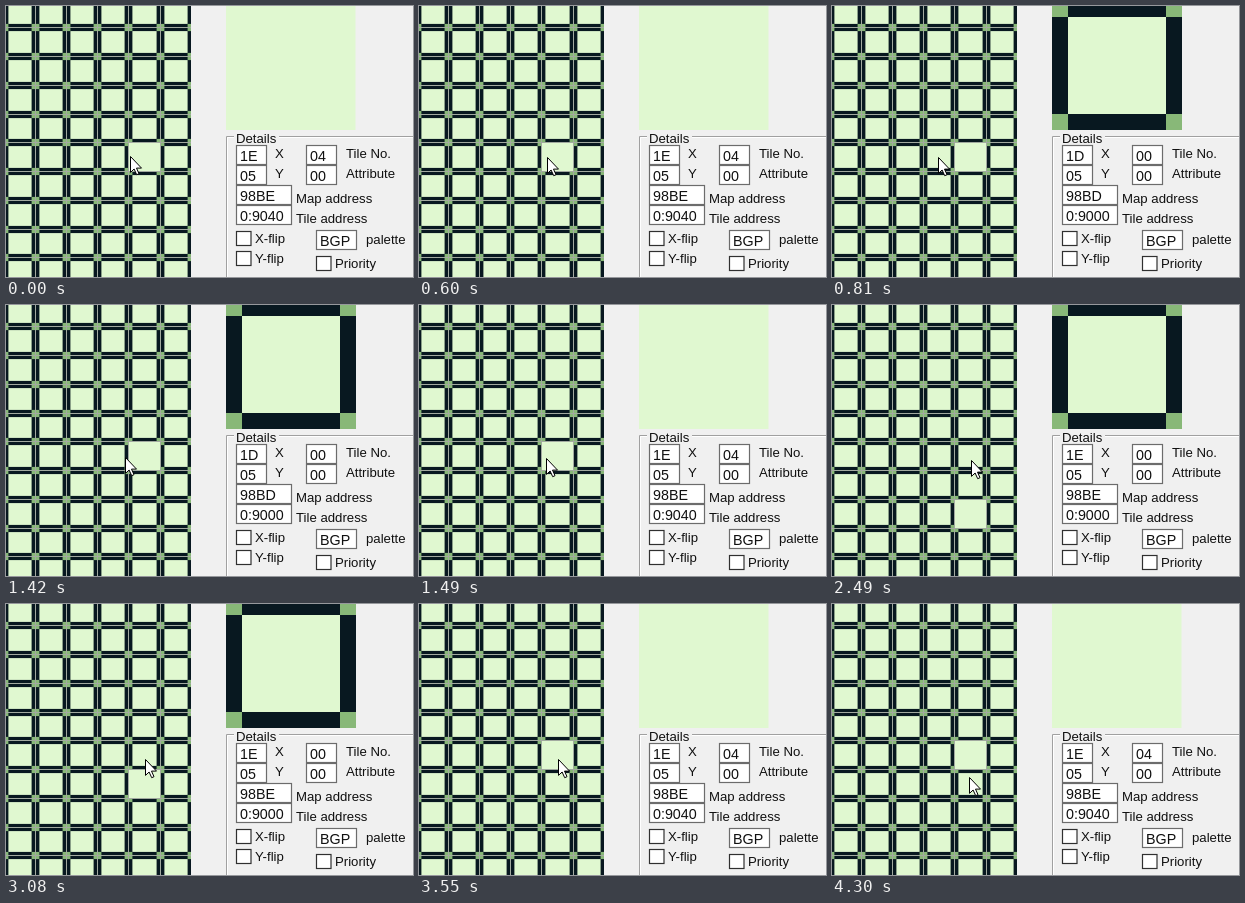
Write an HTML page that moves like this. It is 407 px wide and 271 px high and loops after 4.37 s.

```html
<!DOCTYPE html>
<html lang="en">
<head>
<meta charset="utf-8">
<title>Tile map viewer</title>
<style>
  html, body { margin: 0; width: 100%; height: 100%; overflow: hidden; background: #f0f0f0; }
  svg { display: block; width: 407px; height: 271px; }
  text { font: 13.2px "Liberation Sans", Arial, sans-serif; fill: #101010; }
  .value { font-size: 14.3px; }
  .box { fill: #fff; stroke: #6c6c6c; stroke-width: 1.2; }
  .check { stroke: #303030; }
</style>
</head>
<body>
<svg id="stage" viewBox="0 0 407 271"></svg>
<script>
const LIGHT = '#e0f8d0', MID = '#88b878', DARK = '#081820', LINE = '#a2aaa0';
const LOOP = 4370;
const CELL_W = 31.2, CELL_H = 28.75, LEFT = -1.9, TOP = -6.9, COLS = 6, ROWS = 10;
const stage = document.getElementById('stage');

function add(tag, attrs, parent = stage) {
  const el = document.createElementNS('http://www.w3.org/2000/svg', tag);
  for (const key in attrs) el.setAttribute(key, attrs[key]);
  return parent.appendChild(el);
}
const rect = (x, y, width, height, fill, parent) =>
  add('rect', { x, y, width, height, fill }, parent);

function label(x, y, str, cls = '') {
  const el = add('text', { x, y, class: cls });
  el.textContent = str;
  return el;
}
const box = (x, y, width, height, cls = '') =>
  add('rect', { x: x + .5, y: y + .5, width, height, class: 'box ' + cls });

function field(x, y, w, str = '') {
  box(x, y, w, 19);
  return label(x + 4, y + 16, str, 'value');
}
function check(x, y, str) {
  box(x, y, 14.5, 14, 'check');
  label(x + 19, y + 12, str);
}

// Tile map: grid lines sit on whole pixels
const clip = add('clipPath', { id: 'map' });
rect(0, 0, 185, 271, LIGHT, clip);
const map = add('g', { 'clip-path': 'url(#map)' });
const bx = CELL_W / 8, by = CELL_H / 8;
const colX = c => Math.floor(LEFT + c * CELL_W);
const rowY = r => Math.floor(TOP + r * CELL_H);

rect(0, 0, 185, 271, DARK, map);
for (let r = 0; r < ROWS; r++)
  for (let c = 0; c <= COLS; c++) {
    const x = colX(c) + .5, y = rowY(r) + .5;
    const w = colX(c + 1) + .5 - x, h = rowY(r + 1) + .5 - y;
    rect(x + bx, y + by, w - 2 * bx, h - 2 * by, LIGHT, map);
    rect(x - bx, y - by, 2 * bx, 2 * by, MID, map);
  }
const blank = rect(colX(4) + 1, 0, colX(5) - colX(4) - 1, CELL_H, LIGHT, map);
for (let c = 0; c < COLS; c++) rect(colX(c), 0, 1, 271, LINE, map);
for (let r = 0; r < ROWS; r++) rect(0, rowY(r), 185, 1, LINE, map);

// Enlarged tile
rect(220, 0, 129.5, 124, LIGHT);
const preview = add('g', {});
rect(220, 0, 130, 124, DARK, preview);
rect(236, 11, 98, 97, LIGHT, preview);
for (const x of [220, 334]) {
  rect(x, 0, 16, 11, MID, preview);
  rect(x, 108, 16, 16, MID, preview);
}

// Details panel
add('path', { d: 'M228 130.5H220.5V271M273 130.5H407', fill: 'none', stroke: '#a0a0a0' });
add('path', { d: 'M228 131.5H221.5V271M273 131.5H407', fill: 'none', stroke: '#fff' });
label(230, 137, 'Details');
label(269, 152, 'X');
label(269, 172, 'Y');
label(340, 152, 'Tile No.');
label(340, 172, 'Attribute');
label(290, 197, 'Map address');
label(290, 217, 'Tile address');
label(360, 238, 'palette');
const xVal = field(230, 139, 30);
field(230, 159, 30, '05');
const tileVal = field(300, 139, 30);
field(300, 159, 30, '00');
const mapVal = field(230, 179, 55);
const addrVal = field(230, 199, 55);
field(310, 224, 40, 'BGP');
check(230, 225, 'X-flip');
check(230, 245, 'Y-flip');
check(310, 250, 'Priority');

const cursor = add('path', {
  d: 'M.5 .5V16.4L4.1 13 6.7 18.7 9 17.7 6.5 12.1H11.5Z',
  fill: '#fff', stroke: '#000', 'stroke-width': 1
});

// Each track: [time, ...values], held until the next entry
const pointer = [
  [0, 124, 150], [70, 128, 150], [200, 132, 151], [270, 134, 151],
  [600, 128, 151], [670, 117, 151], [740, 109, 151], [810, 106, 151],
  [1340, 109, 151], [1410, 119, 152], [1490, 127, 153], [1560, 132, 154],
  [1630, 136, 155], [1700, 139, 155], [4300, 137, 173]
];
const blankRow = [[0, 5], [1960, 6], [2490, 7], [3080, 6], [3480, 5]];
const hover = [[0, 'E', 4], [740, 'D', 0], [1490, 'E', 4], [2030, 'E', 0], [3550, 'E', 4]];

const at = (track, t) => track.filter(step => step[0] <= t).pop();

function draw(t) {
  const [, x, y] = at(pointer, t);
  cursor.setAttribute('transform', `translate(${x} ${y})`);

  const row = at(blankRow, t)[1];
  blank.setAttribute('y', rowY(row) + 1);
  blank.setAttribute('height', rowY(row + 1) - rowY(row) - 1);

  const [, col, tile] = at(hover, t);
  xVal.textContent = '1' + col;
  mapVal.textContent = '98B' + col;
  tileVal.textContent = '0' + tile;
  addrVal.textContent = `0:90${tile}0`;
  preview.setAttribute('visibility', tile ? 'hidden' : 'visible');
}

const start = performance.now();
function tick() {
  draw((performance.now() - start) % LOOP);
  requestAnimationFrame(tick);
}
tick();
</script>
</body>
</html>
```
